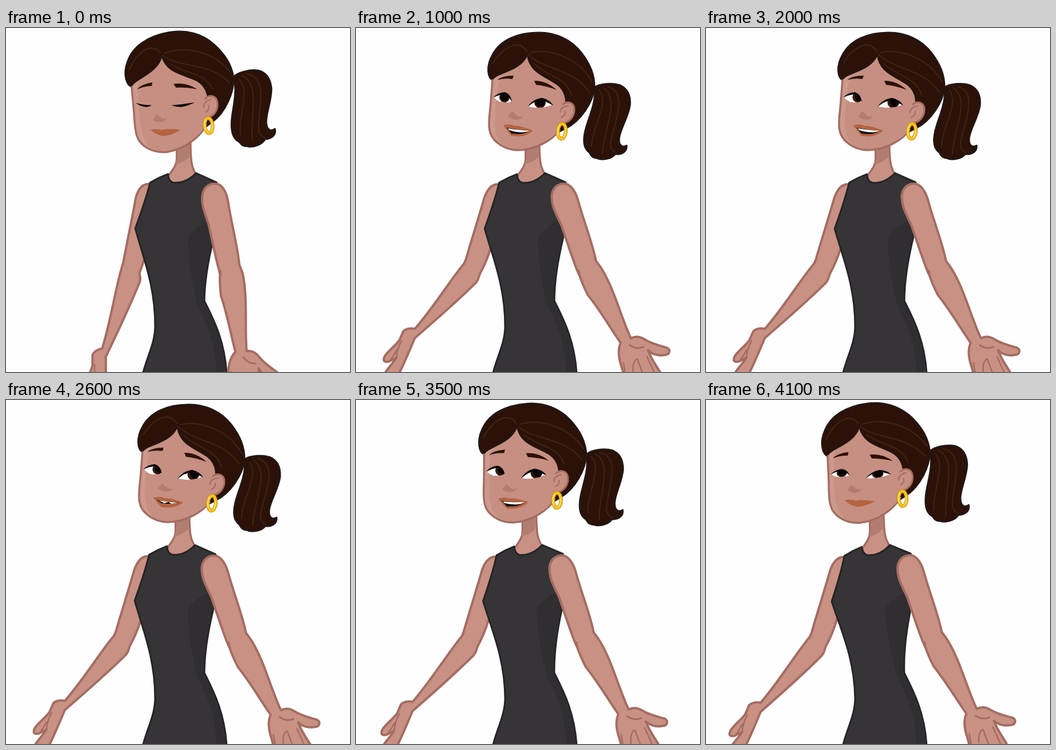
Write an HTML page with a canvas that moves like this. It is 600 by 600 pixels and loops after 4200 ms.

```html
<!DOCTYPE html>
<html lang="en">
<head>
<meta charset="utf-8">
<title>Talking woman</title>
<style>
html, body { margin: 0; width: 100%; height: 100%; overflow: hidden; background: #fefdff; }
canvas { display: block; width: 100vw; height: 100vh; }
</style>
</head>
<body>
<canvas id="stage" width="600" height="600"></canvas>
<script>
const ctx = document.getElementById('stage').getContext('2d');
const LOOP = 4200, STEP = 100;

const SKIN = '#c89184', FACE = '#c68f82', GLOW = '#cd998c', SHADE = '#b27d71', LINE = '#a46d62';
const DRESS = '#363437', DRESS_SHADE = '#302e31', DRESS_LINE = '#252426';
const HAIR = '#2b1107', HAIR_LINE = '#231713', STRAND = '#3f2318';
const LIP = '#b5633f', INK = '#080404';

// Rows: time, head x, head y, head angle, lean, arm raise, brow drop, eye opening, gaze
const KEYS = [
  [0, 333, 141.8, -9.7, 2.5, 0, 6, 0, 0],
  [100, 334.3, 140.5, -8.2, 2.1, .22, 5, 0, 0],
  [200, 336, 142.3, -5.2, 1.4, .62, 3, .5, 0],
  [300, 338.4, 145.4, -2.4, .6, .92, 1, 1, 0],
  [400, 340.2, 147, -.9, 0, 1, 0, 1, 0],
  [700, 343.7, 148.5, 0, .7, 1, 0, 1, 0],
  [1400, 343.7, 148.5, 0, .7, 1, 0, 1, 0],
  [1600, 343.7, 148.5, 0, .7, 1, 0, 1, 1],
  [3000, 343.7, 148.5, 0, .7, 1, 0, 1, 1],
  [3100, 342.7, 148.4, -.2, .2, 1, 0, 1, 1],
  [3500, 333, 144.7, -4.2, -4, 1, 2, 1, 1],
  [3800, 327, 143, -6.2, -7, 1, 4, .85, .3],
  [4100, 324, 142.5, -6.9, -8, 1, 5, .78, 0]
];

// One mouth shape per step: c closed, m half open, o open
const SPEECH = 'cmoooomooo' + 'oomoooomoo' + 'oomooomooo' + 'ommooooomc' + 'cc';

const clamp = (v, lo, hi) => Math.min(hi, Math.max(lo, v));
const mix = (a, b, k) => a + (b - a) * k;

function poseAt(t) {
  let i = 0;
  while (i < KEYS.length - 2 && t >= KEYS[i + 1][0]) i++;
  const a = KEYS[i], b = KEYS[i + 1];
  const k = clamp((t - a[0]) / (b[0] - a[0]), 0, 1);
  const [, x, y, angle, lean, raise, brow, open, gaze] = a.map((v, j) => mix(v, b[j], k));
  return { x, y, angle, lean, raise, brow, open, gaze, mouth: SPEECH[t / STEP] };
}

function bend(d, map) {
  return map ? d.replace(/(-?[\d.]+),(-?[\d.]+)/g, (_, x, y) => map(+x, +y).join()) : d;
}

function shape(d, fill, stroke, width = 3, map) {
  const path = new Path2D(bend(d, map));
  if (fill) { ctx.fillStyle = fill; ctx.fill(path); }
  if (stroke) { ctx.strokeStyle = stroke; ctx.lineWidth = width; ctx.stroke(path); }
}

function turn([x, y], [px, py], degrees) {
  const a = degrees * Math.PI / 180, c = Math.cos(a), s = Math.sin(a);
  return [px + (x - px) * c - (y - py) * s, py + (x - px) * s + (y - py) * c];
}

function bodyMap(lean) {
  return (x, y) => {
    const w = clamp((480 - y) / 220, 0, 1.15);
    return [x + lean * w, y + lean * w * (x - 320) / 320];
  };
}

// Two-bone arm; points near the elbow blend between both bones
function armMap(shoulder, elbow, upper, fore, pose) {
  const down = 1 - pose.raise;
  const moved = turn(elbow, shoulder, upper * down);
  const dx = elbow[0] - shoulder[0], dy = elbow[1] - shoulder[1], len = Math.hypot(dx, dy);
  return (x, y) => {
    const along = ((x - elbow[0]) * dx + (y - elbow[1]) * dy) / len;
    const w = clamp((along + 14) / 28, 0, 1);
    const a = turn([x, y], shoulder, upper * down);
    const b = turn([x, y], elbow, fore * down);
    const px = mix(a[0], b[0] + moved[0] - elbow[0], w);
    const py = mix(a[1], b[1] + moved[1] - elbow[1], w);
    return [px + pose.lean * .85, py + pose.lean * .55 * (px - 320) / 320];
  };
}

function farArm(pose) {
  const map = armMap([242, 290], [202, 420], -5.8, -23.5, pose);
  shape('M250,273 C234,270 225,287 221,304 C212,335 199,376 191,404 L188,411 C163,441 133,490 102,525 ' +
    'C94,523 86,525 82,529 L75,545 C67,556 53,565 49,574 C46,581 49,584 57,582 L70,575 ' +
    'C64,585 56,592 50,602 L44,622 L66,624 L75,602 C84,584 94,560 102,541 ' +
    'C132,515 180,473 209,444 C215,436 213,433 216,428 C223,415 231,395 234,385 L262,300 Z', SKIN, LINE, 4, map);
  shape('M79,546 Q71,560 70,575 M70,562 Q65,572 60,578', null, LINE, 2.5, map);
}

function nearArm(pose) {
  const map = armMap([363, 290], [404, 419], 6.6, 20, pose);
  shape('M358,345 C349,325 339,310 341,290 C344,273 358,270 367,272 C379,277 385,293 388,305 ' +
    'C396,335 412,375 418,406 L426,417 C449,452 461,503 479,541 C486,537 495,538 503,543 ' +
    'C516,551 530,554 541,557 C549,560 547,570 538,570 C527,572 516,569 509,562 ' +
    'C514,576 522,588 530,600 L540,626 L472,626 L463,592 C457,575 456,560 461,549 ' +
    'C441,520 423,489 404,466 C396,450 392,440 389,431 L386,425 C374,395 364,362 358,345 Z', SKIN, LINE, 4, map);
  shape('M477,553 Q489,561 501,556 M388,423 L390,432', null, LINE, 3, map);
  shape('M489,577 Q481,583 483,600 M490,577 L500,604 M507,573 L521,604 M466,584 L469,602', null, LINE, 2.5, map);
}

function torso(pose) {
  const map = bodyMap(pose.lean);
  shape('M295,195 L295,228 C295,240 289,246 278,262 L300,285 L332,260 C321,245 319,235 319,195 Z', SKIN, LINE, 3.5, map);
  shape('M297,200 L296,226 Q295,233 292,238 Q310,234 317,225 L317,200 Z', SHADE, null, 0, map);
  shape('M280,255 C281,267 287,271 294,270 C309,270 320,262 329,253 L365,269 C340,285 342,308 361,350 ' +
    'L361,366 C353,400 346,440 346,476 C361,506 382,545 385,605 L238,605 C246,572 260,550 260,520 ' +
    'C260,450 238,400 224,350 C231,330 242,300 249,270 Q264,261 280,255 Z', DRESS, DRESS_LINE, 3, map);
  shape('M361,330 L345,339 Q324,354 317,363 C316,410 329,465 334,484 C350,515 366,550 367,601 ' +
    'L382,601 C379,545 360,508 344,477 C344,440 351,400 359,366 Z', DRESS_SHADE, null, 0, map);
}

function hair() {
  shape('M416,104 C424,97 447,95 461,100 C474,106 479,118 478,134 C475,156 461,175 459,192 ' +
    'C458,203 463,210 472,205 C473,214 466,221 452,220 C445,229 428,231 420,227 C411,226 409,221 407,217 ' +
    'C397,210 396,198 399,183 C402,165 415,140 416,120 Z', HAIR, HAIR_LINE, 3);
  shape('M424,108 C443,132 412,170 411,207 M431,104 C462,125 432,175 430,219 M440,102 C476,115 450,165 445,195 Q441,212 453,217',
    null, STRAND, 2);
  shape('M239,91 C229,87 227,66 238,47 C251,22 280,8 319,8 C348,8 375,20 393,43 C409,64 416,82 416,104 ' +
    'C413,130 392,162 366,175 L350,183 L330,150 L300,70 Z', HAIR, HAIR_LINE, 3);
  shape('M301,46 C325,73 380,70 407,112 M304,43 C340,35 389,53 412,94 M298,41 C285,18 257,33 239,61 M310,62 C336,86 366,85 376,117',
    null, STRAND, 2);
}

function face() {
  const cheek = 'C234,145 230,165 233,178 C235,193 253,212 281,213';
  const forehead = 'M238,90 C246,77 286,76 299,47';
  shape('M281,213 C316,213 347,190 360,168 L366,131 C366,117 361,106 350,98 C330,84 302,77 299,47 ' +
    `C286,76 246,77 238,90 L235,130 ${cheek} Z`, FACE);
  shape('M281,213 Q272,213 268,211 C251,205 241,187 242,158 C244,135 245,110 252,81 Q241,84 238,90 L235,130 ' + cheek, GLOW);
  shape(`${forehead} C302,77 330,84 350,98 C361,106 366,117 366,131`, null, HAIR_LINE, 2);
  shape(`M238,91 L235,130 ${cheek} C314,213 343,195 355,178`, null, LINE, 3.5);
  shape('M359,134 C367,125 381,130 381,142 C381,156 371,165 361,166 L355,162 Z', FACE);
  shape('M361,133 C369,126 381,130 381,142 C381,156 371,165 361,166', null, LINE, 3);
  shape('M356,147 Q357,137 370,136 M358,156 Q366,153 365,145', null, LINE, 2);
  shape('M272,145 Q269,151 265,154 Q272,160 281,160 Q288,159 292,154 Q283,157 278,150 Z', SHADE);
}

function brows(drop) {
  ctx.save();
  ctx.translate(0, drop);
  shape('M246,91 Q255,83 275,83 L273,89 Q257,87 246,91 Z M311,92 Q333,92 350,108 Q332,101 314,99 Z', HAIR);
  ctx.restore();
}

function eye(white, lash, ix, iy, radius, base, pose) {
  ctx.save();
  ctx.translate(0, base);
  ctx.scale(1, pose.open);
  ctx.translate(0, -base);
  ctx.save();
  ctx.clip(new Path2D(white));
  shape(white, '#fff');
  const disc = (x, y, r, color) => {
    ctx.fillStyle = color;
    ctx.beginPath();
    ctx.arc(x, y, r, 0, 7);
    ctx.fill();
  };
  const x = ix + pose.gaze * 5.5;
  disc(x, iy, radius, '#3c1b0e');
  disc(x + .5 + pose.gaze * 2, iy - .8, radius - 1.8, INK);
  ctx.restore();
  shape(lash, INK);
  ctx.restore();
}

function eyes(pose) {
  if (pose.open < .2) {
    shape('M240,119 Q253,126 267,128 Q262,131 255,129 Q246,126 240,119 Z ' +
      'M301,134 Q321,136 342,136 Q330,140 318,140 Q308,138 301,134 Z', INK);
    return;
  }
  eye('M241,122 Q250,114 262,114 Q269,118 271,129 Q263,131 251,129 Q245,126 241,122 Z',
    'M239,121 Q249,112 260,112 Q270,115 272,129 Q267,119 260,116 Q250,116 239,121 Z', 259, 121, 9, 130, pose);
  eye('M300,137 Q310,125 325,123 Q337,126 342,134 Q331,139 318,139 Q307,139 300,137 Z',
    'M299,138 Q309,123 325,122 Q338,125 344,135 Q334,130 325,126 Q311,127 299,138 Z', 321, 130, 10, 138, pose);
}

function mouth(kind) {
  if (kind === 'c') {
    shape('M258,170 Q270,170 278,174 Q285,172 310,179 Q293,186 280,185 Q267,182 258,170 Z', LIP);
    return;
  }
  const open = kind === 'o' ? 1 : .55;
  ctx.save();
  ctx.translate(0, 176 * (1 - open) * .25);
  ctx.scale(1, .75 + open * .25);
  shape('M257,170 Q268,166 277,171 Q284,169 309,179 Q298,189 283,189 L271,188 Q264,180 257,170 Z', LIP);
  ctx.restore();
  const low = 176 + 9 * open;
  shape(`M263,174 Q281,178 303,179 Q294,${low} 283,${low} L271,${low - 1} Z`, INK);
  if (kind === 'o') shape('M265,175 Q281,178 303,179 Q297,182 291,182 Q277,182 267,178 Z', '#fff');
  else shape('M266,175 Q282,178 300,179 L289,181 L283,178 L276,180 Z', '#fff');
}

function earring() {
  const ring = (color, width) => {
    ctx.strokeStyle = color;
    ctx.lineWidth = width;
    ctx.beginPath();
    ctx.ellipse(359, 180, 7, 13, .08, 0, 7);
    ctx.stroke();
  };
  ring('#c58c12', 6.4);
  ring('#f5c31b', 4.6);
  shape('M353,187 Q350,177 355,169 M362,190 Q366,184 365,176', null, '#ffe473', 1.6);
}

function head(pose) {
  ctx.save();
  ctx.translate(pose.x, pose.y);
  ctx.rotate(pose.angle * Math.PI / 180);
  ctx.translate(-343.7, -148.5);
  hair();
  face();
  brows(pose.brow);
  eyes(pose);
  mouth(pose.mouth);
  earring();
  ctx.restore();
}

function draw() {
  const t = Math.floor(performance.now() % LOOP / STEP) * STEP;
  const pose = poseAt(t);
  ctx.fillStyle = '#fefdff';
  ctx.fillRect(0, 0, 600, 600);
  ctx.lineJoin = ctx.lineCap = 'round';
  farArm(pose);
  torso(pose);
  nearArm(pose);
  head(pose);
  requestAnimationFrame(draw);
}
draw();
</script>
</body>
</html>
```
